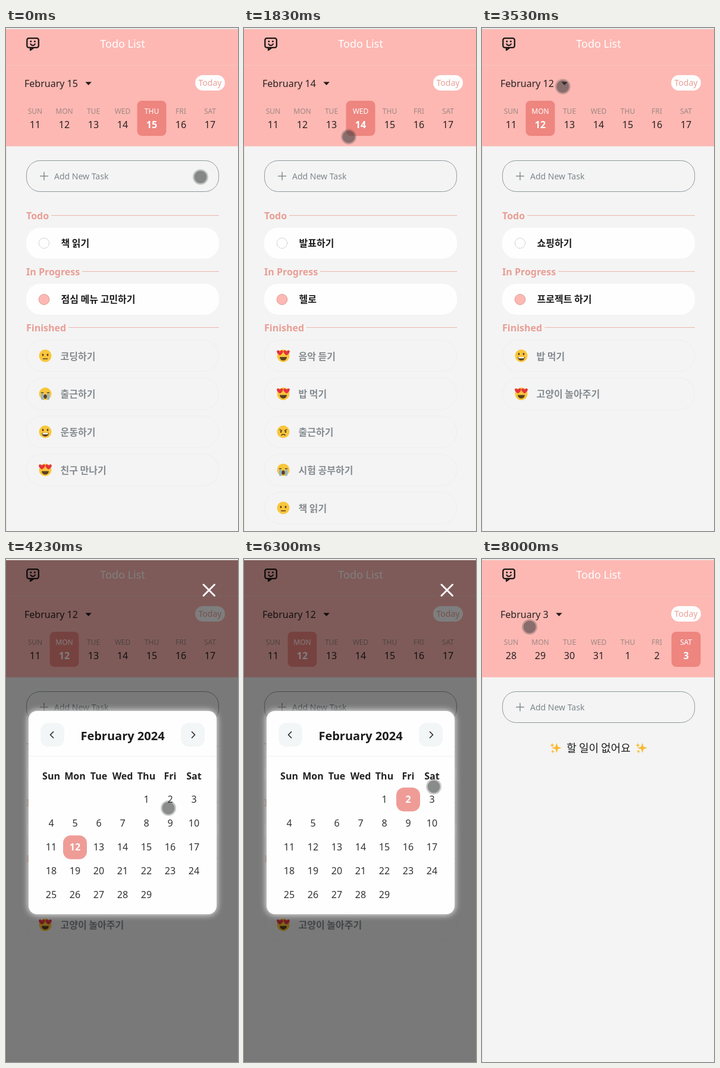
An HTML page with a canvas that plays this animation: 390x844 px, repeating every 8030 ms.

```html
<!DOCTYPE html>
<html lang="ko">
<head>
<meta charset="utf-8">
<title>Todo List</title>
<style>
html, body { margin: 0; width: 100%; height: 100%; overflow: hidden; background: #f4f4f4; }
canvas { display: block; width: 100%; height: 100%; }
</style>
</head>
<body>
<canvas id="stage"></canvas>
<script>
const W = 390, H = 844, LOOP = 8030, HEAD = 198.5;
const canvas = document.getElementById('stage');
const ctx = canvas.getContext('2d');
const LATIN = '"Noto Sans", sans-serif';
const KOREAN = '"Noto Sans CJK KR", "Noto Sans CJK", sans-serif';
const WEEK = ['Sun', 'Mon', 'Tue', 'Wed', 'Thu', 'Fri', 'Sat'];
const INK = '#5b4024';

// Tasks arrive a moment after the date changes.
const FETCH = 370;
const TASKS = {
  15: { todo: '책 읽기', doing: '점심 메뉴 고민하기', done: [
    ['neutral', '코딩하기'], ['cry', '출근하기'], ['grin', '운동하기'], ['love', '친구 만나기']] },
  14: { todo: '발표하기', doing: '헬로', done: [
    ['love', '음악 듣기'], ['love', '밥 먹기'], ['angry', '출근하기'],
    ['cry', '시험 공부하기'], ['neutral', '책 읽기'], ['grin', '운동하기']] },
  12: { todo: '쇼핑하기', doing: '프로젝트 하기', done: [
    ['grin', '밥 먹기'], ['love', '고양이 놀아주기']] }
};
TASKS[13] = TASKS[14];

const OPEN = 3570, CLOSE = 6980;
const dateAt = t => t < 1350 ? 15 : t < 2650 ? 14 : t < 3060 ? 13 : t < CLOSE ? 12 : 3;
const pickAt = t => t < 5050 ? 12 : t < 6470 ? 2 : 3;

// Pointer moves: [start, end, x, y]; it rests in between.
const HOME = [327, 250];
const MOVES = [
  [30, 300, 376, 228],
  [300, 860, 126, 241],
  [860, 1100, 217, 168],
  [1330, 2100, 160, 188],
  [2200, 2400, 122, 172],
  [2700, 3050, 100, 164],
  [3050, 3550, 136, 98],
  [3550, 3930, 262, 420],
  [4130, 4230, 273, 418],
  [4700, 4730, 289, 413],
  [5030, 5530, 302, 318],
  [5730, 5870, 325, 341],
  [6030, 6300, 319, 382],
  [6450, 6960, 341, 58],
  [6960, 7100, 353, 74],
  [7100, 7900, 55, 50],
  [7900, 8000, 80, 114]
];

function pointerAt(t) {
  let [x, y] = HOME;
  for (const [from, to, tx, ty] of MOVES) {
    const u = Math.min(1, Math.max(0, (t - from) / (to - from)));
    const k = u * u * (3 - 2 * u);
    x += (tx - x) * k;
    y += (ty - y) * k;
  }
  return [x, y];
}

function text(s, x, y, size, color, weight = 400, align = 'left', family = LATIN) {
  ctx.font = `${weight} ${size}px ${family}`;
  ctx.textAlign = align;
  ctx.fillStyle = color;
  ctx.fillText(s, x, y);
  return ctx.measureText(s).width;
}

function rect(x, y, w, h, color) {
  ctx.fillStyle = color;
  ctx.fillRect(x, y, w, h);
}

function paint(fill, stroke, width = 1) {
  if (fill) { ctx.fillStyle = fill; ctx.fill(); }
  if (stroke) { ctx.strokeStyle = stroke; ctx.lineWidth = width; ctx.stroke(); }
}

function box(x, y, w, h, r, fill, stroke, width) {
  ctx.beginPath();
  ctx.roundRect(x, y, w, h, r);
  paint(fill, stroke, width);
}

function oval(x, y, rx, ry, fill, stroke, width) {
  ctx.beginPath();
  ctx.ellipse(x, y, rx, ry, 0, 0, 7);
  paint(fill, stroke, width);
}

function arc(x, y, r, a, b, color, width) {
  ctx.beginPath();
  ctx.arc(x, y, r, a * Math.PI, b * Math.PI);
  paint(null, color, width);
}

function line(color, width, ...points) {
  ctx.beginPath();
  for (let i = 0; i < points.length; i += 2) ctx.lineTo(points[i], points[i + 1]);
  paint(null, color, width);
}

function heart(x, y, s) {
  ctx.beginPath();
  ctx.moveTo(x, y + s);
  ctx.bezierCurveTo(x - 2.1 * s, y - 0.2 * s, x - s, y - 1.7 * s, x, y - 0.5 * s);
  ctx.bezierCurveTo(x + s, y - 1.7 * s, x + 2.1 * s, y - 0.2 * s, x, y + s);
  paint('#e5343c');
}

function mouth() {
  ctx.beginPath();
  ctx.arc(0, 2, 6, 0, Math.PI);
  paint(INK);
}

const FACES = {
  neutral() {
    for (const x of [-4, 4]) oval(x, -1.5, 1.4, 1.9, INK);
    line(INK, 1.5, -4, 5, 4, 5);
  },
  grin() {
    for (const x of [-4, 4]) oval(x, -3, 1.4, 2, INK);
    mouth();
    box(-4.8, 2, 9.6, 2.2, 1, '#fff');
  },
  love() {
    mouth();
    for (const x of [-5.6, 5.6]) heart(x, -5, 4.4);
  },
  cry() {
    for (const x of [-5, 5]) {
      box(x - 2, -1, 4, 11, 1.5, '#8fb6d0');
      line(INK, 1.4, x - 2.2, -2, x + 2.2, -2);
    }
    oval(0, 4.5, 2.8, 3.6, INK);
  },
  angry() {
    for (const s of [-1, 1]) {
      oval(s * 4, 0, 1.4, 1.7, INK);
      line(INK, 1.5, s * 6.5, -4, s * 1.8, -1.8);
    }
    arc(0, 8, 3.8, 1.15, 1.85, INK, 1.5);
  }
};

function emoji(kind, x, y) {
  ctx.save();
  ctx.translate(x, y);
  oval(0, 0, 10.5, 10.5, '#f9c63b');
  FACES[kind]();
  ctx.restore();
}

function star(x, y, r) {
  ctx.beginPath();
  for (let i = 0; i < 8; i++) {
    const d = i % 2 ? r * 0.34 : r, a = i * Math.PI / 4;
    ctx.lineTo(x + d * Math.sin(a), y - d * Math.cos(a));
  }
  paint('#f9b931');
}

function sparkles(x, y) {
  star(x + 1.5, y, 8.5);
  star(x - 6, y - 4.5, 4);
  star(x - 5, y + 6, 3.5);
}

function chatIcon() {
  const c = '#1d1716';
  box(35.3, 17.2, 19.5, 15.6, 3, null, c, 2.3);
  ctx.lineJoin = 'round';
  line(c, 2.3, 46.5, 33, 41, 37, 41, 33);
  for (const x of [41.8, 48.4]) oval(x, 22.6, 1.5, 1.5, c);
  arc(45.1, 25, 4.2, 0.08, 0.92, c, 2);
}

function header(date) {
  rect(0, 0, W, 2, '#e9e9e9');
  rect(0, 2, W, HEAD - 2, '#fdb8b3');
  rect(0, 62, W, 1, '#fcc6bb');
  chatIcon();
  text('Todo List', 196, 33, 18, '#fff', 400, 'center');

  const end = 31 + text('February ' + date, 31, 99, 16, '#2a2120');
  ctx.beginPath();
  ctx.moveTo(end + 12.5, 90.5);
  ctx.lineTo(end + 23, 90.5);
  ctx.lineTo(end + 17.75, 96);
  paint('#211a19');
  box(318, 79, 50, 26, 13, '#fefdfd');
  text('Today', 343, 97, 14, '#e9a098', 400, 'center');

  const sunday = new Date(2024, 1, date - new Date(2024, 1, date).getDay());
  WEEK.forEach((name, i) => {
    const x = 49 + 49 * i;
    const day = new Date(2024, sunday.getMonth(), sunday.getDate() + i).getDate();
    const on = day === date;
    if (on) box(x - 24.5, 122, 49, 59, 8, '#ee857f');
    text(name.toUpperCase(), x, 143.5, 12, on ? '#fff' : '#a08783', on ? 500 : 400, 'center');
    text(day, x, 168, 16, on ? '#fff' : '#2a2120', on ? 600 : 500, 'center');
  });
}

function addTask() {
  box(34.5, 222.5, 323, 52, 23, null, '#8f989d');
  line('#7d868b', 1.4, 57, 248.5, 71, 248.5);
  line('#7d868b', 1.4, 64, 241.5, 64, 255.5);
  text('Add New Task', 81, 254, 14, '#7d868b', 500);
}

function section(name, y) {
  const w = text(name, 34, y + 6, 16, '#e99e95', 600);
  rect(38 + w, y - 1, 320 - w, 1, '#ecb6ac');
}

function task(label, y) {
  box(34, y, 324, 52, 24, '#fefefe');
  text(label, 92.5, y + 32, 16, '#1c1c1c', 700, 'left', KOREAN);
}

function taskList(list) {
  if (!list) {
    text('할 일이 없어요', 196, 323.5, 18, '#1c1c1c', 500, 'center', KOREAN);
    sparkles(124, 317);
    sparkles(268, 317);
    return;
  }
  section('Todo', 315);
  task(list.todo, 335);
  ctx.setLineDash([2, 1.4]);
  oval(64, 361, 8.6, 8.6, null, '#b5b5b5');
  ctx.setLineDash([]);

  section('In Progress', 409);
  task(list.doing, 429);
  oval(64, 455.5, 8.8, 8.8, '#fdb8b3', '#dd9992');

  section('Finished', 503);
  list.done.forEach(([mood, label], i) => {
    const y = 523 + 63.8 * i;
    box(34.5, y + 0.5, 323, 53, 26, '#f4f4f4', '#eeeeee');
    emoji(mood, 66, y + 27);
    text(label, 91.5, y + 33.5, 16, '#858b90', 700, 'left', KOREAN);
  });
}

function calendar(pick) {
  rect(0, 2, W, H - 2, 'rgba(0, 0, 0, 0.5)');
  ctx.lineCap = 'round';
  line('#fff', 3, 332, 43, 350.5, 61.5);
  line('#fff', 3, 350.5, 43, 332, 61.5);

  ctx.save();
  ctx.shadowColor = '#fff';
  ctx.shadowBlur = 12 * canvas.width / W;
  box(38, 255, 316, 341, 14, '#fefefe');
  ctx.restore();

  for (const s of [-1, 1]) {
    box(176 + 118 * s, 275, 40, 40, 13, '#f2f6f7');
    const x = 196 + 119 * s;
    line('#2b2b2b', 1.7, x - 2.5 * s, 290, x + 2.5 * s, 295, x - 2.5 * s, 300);
  }
  ctx.lineCap = 'butt';
  text('February 2024', 196, 303.5, 20, '#1c1c1c', 600, 'center');
  rect(38, 330.5, 316, 1, '#eef0f0');

  WEEK.forEach((name, i) => text(name, 76 + 40 * i, 369.5, 16, '#222', 600, 'center'));
  for (let day = 1; day <= 29; day++) {
    const cell = day + 3;
    const x = 76 + 40 * (cell % 7), y = 403.5 + 40.1 * Math.floor(cell / 7);
    const on = day === pick;
    if (on) box(x - 20, y - 20, 40, 40, 13, '#ef9c97');
    text(day, x, y + 5.5, 16, on ? '#fff' : '#333', on ? 600 : 500, 'center');
  }
}

function pointer(x, y) {
  oval(x, y, 13, 13, 'rgba(70, 70, 70, 0.28)');
  oval(x, y, 10.5, 10.5, 'rgba(50, 52, 53, 0.42)');
}

function draw(t) {
  const dpr = devicePixelRatio || 1;
  const w = Math.round(innerWidth * dpr), h = Math.round(innerHeight * dpr);
  if (canvas.width !== w || canvas.height !== h) {
    canvas.width = w;
    canvas.height = h;
  }
  ctx.setTransform(w / W, 0, 0, h / H, 0, 0);
  rect(0, 0, W, H, '#f4f4f4');
  header(dateAt(t));
  addTask();
  taskList(TASKS[dateAt(t - FETCH)]);
  rect(0, HEAD, 1, H - HEAD, '#e1e1e1');
  if (t >= OPEN && t < CLOSE) calendar(pickAt(t));
  pointer(...pointerAt(t));
}

const start = performance.now();
function tick() {
  draw((performance.now() - start) % LOOP);
  requestAnimationFrame(tick);
}
tick();
</script>
</body>
</html>
```
